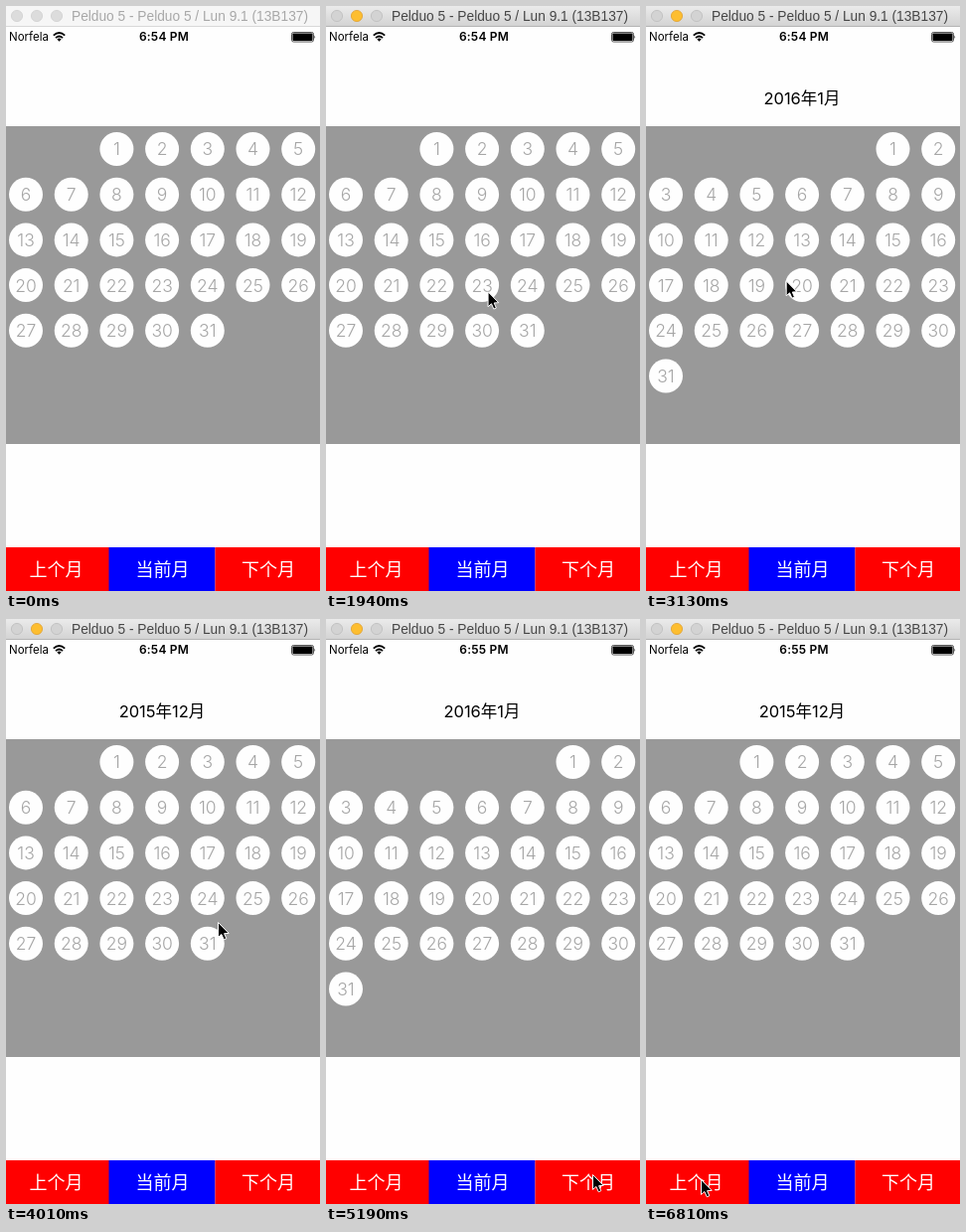
An HTML page for the animation above (8000 ms loop, 316 px wide and 589 px high).

```html
<!DOCTYPE html>
<html lang="zh-CN">
<head>
<meta charset="utf-8">
<title>Calendar</title>
<style>
html, body { margin: 0; width: 100%; height: 100%; overflow: hidden; background: #fefefe; }
svg { display: block; width: 100vw; height: 100vh; }
text { font-family: Inter, "Noto Sans CJK SC", "Noto Sans CJK", sans-serif; text-anchor: middle; }
#title { font: 13.72px "Liberation Sans", Arial, sans-serif; text-anchor: start; }
#days text { font-size: 17.5px; font-weight: 300; fill: #a6a6a6; }
#buttons text { font-size: 18px; font-weight: 300; fill: #fff; }
</style>
</head>
<body>
<svg viewBox="0 0 316 589">
  <defs>
    <linearGradient id="bar" x2="0" y2="1">
      <stop stop-color="#ebebeb"/><stop offset="1" stop-color="#d2d2d2"/>
    </linearGradient>
  </defs>
  <rect width="316" height="589" fill="#fefefe"/>
  <rect id="chrome" width="316" height="21"/>
  <path id="edge" d="M0 20.5H316"/>
  <g id="lights"></g>
  <text id="title" x="66" y="15">Pelduo 5 - Pelduo 5 / Lun 9.1 (13B137)</text>

  <text x="3" y="35.3" font-size="11.5" style="text-anchor:start">Norfela</text>
  <g fill="none" stroke="#000" stroke-width="1.8">
    <path d="M47.8 29.7Q53.5 24.4 59.2 29.7"/>
    <path d="M50 32.1Q53.5 28.9 57 32.1"/>
  </g>
  <path d="M51.4 33.4Q53.5 31.8 55.6 33.4L53.5 35.7Z"/>
  <text id="clock" x="159" y="35.3" font-size="12" font-weight="600" letter-spacing=".2"></text>
  <rect x="287.5" y="26.5" width="22" height="9.5" rx="1.8" fill="none" stroke="#555"/>
  <rect x="288.5" y="27.5" width="20" height="7.5" rx=".8"/>
  <path d="M310.5 29.5q1.4 1.7 0 3.5z"/>

  <text id="month" x="157" y="99" font-size="16.5"></text>
  <rect y="121" width="316" height="320" fill="#999"/>
  <g id="days"></g>
  <g id="buttons"></g>
  <path id="cursor" d="M0 0V15L3.4 12L5.8 17.3L8.3 16.2L6.1 11.2L10.7 10.9Z" stroke="#fff" stroke-width="1"/>
</svg>
<script>
const LOOP = 8000, TICK = 147.9;
const $ = id => document.getElementById(id);

// [label, first column, number of days]
const DEC = ['2015年12月', 2, 31];
const JAN = ['2016年1月', 5, 31];
const FEB = ['2016年2月', 1, 28];

// Hard changes: [tick, value]
const months = [[0, ['', 2, 31]], [18, JAN], [23, DEC], [33, JAN], [37, FEB], [43, JAN], [46, DEC]];
const clocks = [[0, '6:54 PM'], [29, '6:55 PM']];
const focus = [[0, false], [12, true]];

// Pointer path: [tick, x, y]
const path = [
  [4, 303, 318], [5, 262, 316], [6, 237, 314], [8, 237, 314], [9, 230, 313],
  [16, 112, 268], [18, 96, 266], [20, 112, 272], [23, 198, 285], [24, 206, 292],
  [27, 213, 305], [29, 244, 410], [31, 279, 540], [32, 267, 559], [34, 267, 559],
  [35, 268, 559], [37, 267, 560], [38, 215, 562], [39, 135, 563], [40, 74, 564], [41, 55, 564]
];

const at = (list, k) => list.filter(e => e[0] <= k).pop()[1];

function pointer(k) {
  const i = path.findIndex(p => p[0] > k);
  if (i < 0) return path[path.length - 1].slice(1);
  const [a, x, y] = path[i - 1], [b, u, v] = path[i];
  const f = (k - a) / (b - a);
  return [x + (u - x) * f, y + (v - y) * f];
}

function grid([, first, count]) {
  let out = '';
  for (let d = 1; d <= count; d++) {
    const n = first + d - 1;
    const x = 20 + n % 7 * 45.7, y = 144 + Math.floor(n / 7) * 45.7;
    out += `<circle cx="${x}" cy="${y}" r="17" fill="#fefefe"/><text x="${x}" y="${y + 6.4}">${d}</text>`;
  }
  return out;
}

function setFocus(on) {
  $('chrome').setAttribute('fill', on ? 'url(#bar)' : '#f6f6f6');
  $('edge').setAttribute('stroke', on ? '#b4b4b4' : '#d8d8d8');
  $('title').setAttribute('fill', on ? '#464646' : '#a8a8a8');
  $('lights').innerHTML = [11, 31, 51].map((x, i) => {
    const lit = on && i === 1;
    const fill = lit ? '#fdbe30' : on ? '#d3d3d3' : '#dcdcdc';
    const line = lit ? '#e0a030' : on ? '#bdbdbd' : '#d0d0d0';
    return `<circle cx="${x}" cy="10" r="5.6" fill="${fill}" stroke="${line}" stroke-width=".8"/>`;
  }).join('');
}

$('buttons').innerHTML = [
  ['上个月', 0, 104, '#f00', 50.5], ['当前月', 103.5, 107, '#00f', 157.5], ['下个月', 210.5, 106, '#f00', 264]
].map(([label, x, w, fill, mid]) =>
  `<rect x="${x}" y="545" width="${w}" height="44" fill="${fill}"/><text x="${mid}" y="573.7">${label}</text>`
).join('');

let last = -1;
function draw(t) {
  const k = Math.floor(t % LOOP / TICK);
  if (k !== last) {
    last = k;
    const month = at(months, k);
    $('month').textContent = month[0];
    $('days').innerHTML = grid(month);
    $('clock').textContent = at(clocks, k);
    setFocus(at(focus, k));
    $('cursor').style.display = k < path[0][0] ? 'none' : '';
    if (k >= path[0][0]) {
      const [x, y] = pointer(k);
      $('cursor').setAttribute('transform', `translate(${x + .5} ${y + .5})`);
    }
  }
}

const start = performance.now();
function frame() {
  draw(performance.now() - start);
  requestAnimationFrame(frame);
}
frame();
</script>
</body>
</html>
```
